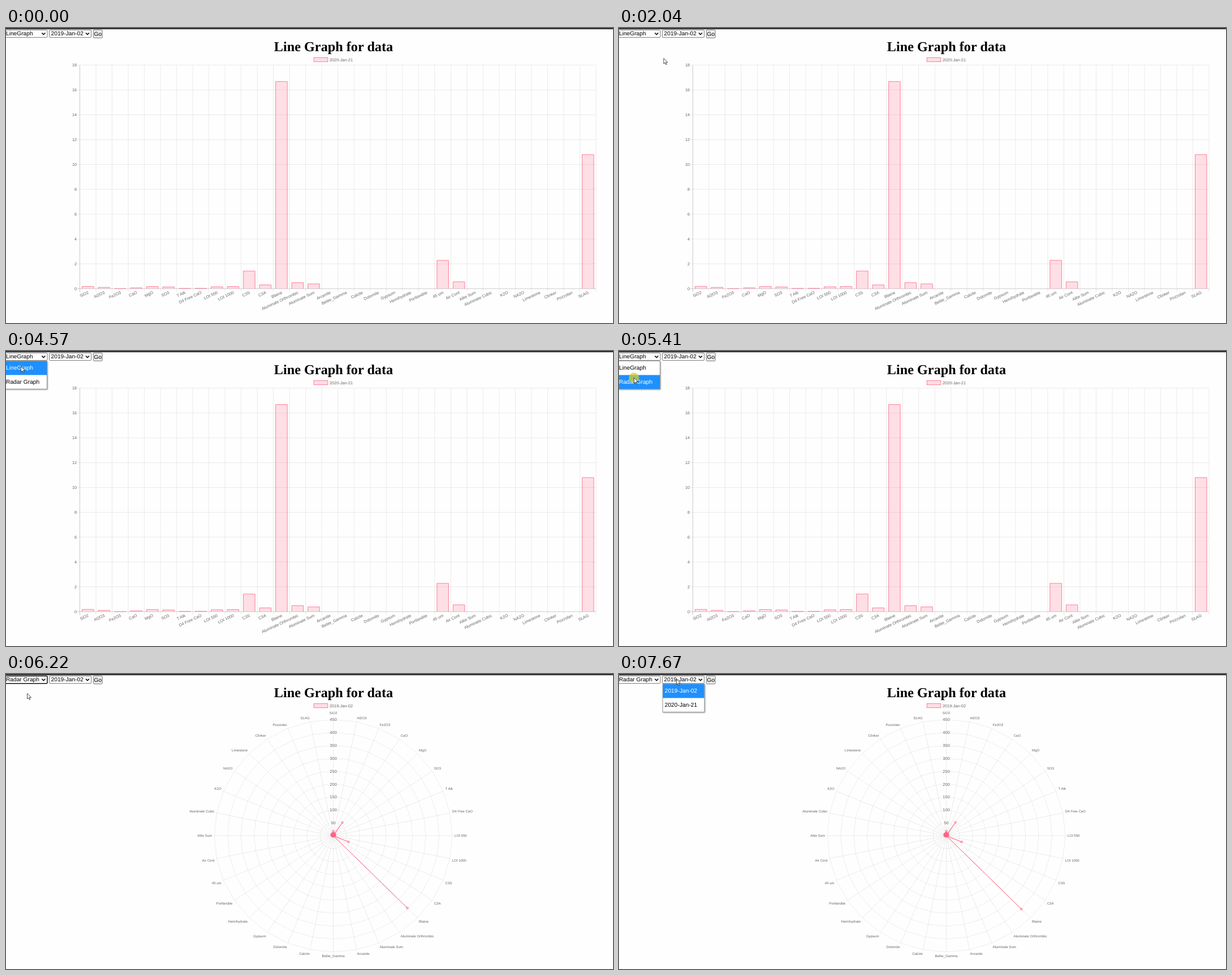
Animation, 1073 px wide and 522 px high, one loop 7990 ms. Source, as an HTML page:

```html
<!DOCTYPE html>
<html lang="en">
<head>
<meta charset="utf-8">
<title>Line Graph for data</title>
<style>
  html, body { margin: 0; width: 100%; height: 100%; overflow: hidden; background: #fefefe; }
  svg { display: block; width: 1073px; height: 522px; }
  text { font-family: "Liberation Sans", Arial, sans-serif; text-rendering: geometricPrecision; }
  .title { font-family: "Liberation Serif", "Times New Roman", serif; font-weight: bold; }
  .list { filter: drop-shadow(1px 1px 1.2px rgba(0, 0, 0, .4)); }
</style>
</head>
<body>
<svg id="stage" viewBox="0 0 1073 522"></svg>
<script>
const LOOP = 7990;
const OPEN_KIND = 3640, PICK_KIND = 5410, SWITCH = 5580, OPEN_DATE = 7520;
const PINK = 'rgb(255,99,132)', PALE = 'rgba(255,99,132,.2)';
const GRID = 'rgba(0,0,0,.1)', AXIS = 'rgba(0,0,0,.25)', GREY = '#666';
const LABELS = ('SiO2,Al2O3,Fe2O3,CaO,MgO,SO3,T Alk,D4 Free CaO,LOI 550,LOI 1000,C3S,C3A,Blaine,' +
  'Aluminate Orthrombic,Aluminate Sum,Arcanite,Belite_Gamma,Calcite,Dolomite,Gypsum,Hemihydrate,' +
  'Portlandite,45 um,Air Cont,Alite Sum,Aluminate Cubic,K2O,NA2O,Limestone,Clinker,Pozzolan,SLAG').split(',');

// The large values are named; the traces around them follow a wave.
const barPeaks = {
  'C3S': 1.42, 'C3A': .3, 'Blaine': 16.68, 'Aluminate Orthrombic': .48, 'Aluminate Sum': .38,
  '45 um': 2.28, 'Air Cont': .55, 'SLAG': 10.8
};
const radarPeaks = { 'SiO2': 18, 'CaO': 62.5, 'C3S': 63, 'Blaine': 402 };
const barValue = (name, i) => barPeaks[name] || (i < 10 ? .09 + .09 * Math.cos(i * 1.46) : 0);
const radarValue = (name, i) => radarPeaks[name] || Math.max(0, 4 + 5 * Math.cos(i / 5));

const stage = document.getElementById('stage');

function add(parent, tag, attrs) {
  const el = document.createElementNS('http://www.w3.org/2000/svg', tag);
  set(el, attrs);
  return parent.appendChild(el);
}
function set(el, attrs) {
  for (const key in attrs) el.setAttribute(key, attrs[key]);
}
const group = (parent, attrs) => add(parent, 'g', attrs);
const line = (parent, x1, y1, x2, y2, stroke) =>
  add(parent, 'line', { x1, y1, x2, y2, stroke, 'stroke-width': .8 });
const rect = (parent, x, y, width, height, attrs) =>
  add(parent, 'rect', { x, y, width, height, ...attrs });
// Text centred vertically on y.
function label(parent, str, x, y, size, fill = GREY, anchor = 'start', attrs = {}) {
  const el = add(parent, 'text', { x, y: y + size * .36, 'font-size': size, fill, 'text-anchor': anchor, ...attrs });
  el.textContent = str;
  return el;
}
const show = (el, on) => set(el, { visibility: on ? 'inherit' : 'hidden' });

// Page
rect(stage, 0, 0, 1073, 522, { fill: '#fefefe' });
rect(stage, 0, 0, 1073, 2.2, { fill: '#2f2c30' });
label(stage, 'Line Graph for data', 579, 32, 24.25, '#000', 'middle', { class: 'title' });
rect(stage, 544.2, 52.3, 24.6, 7.4, { fill: PALE, stroke: PINK, 'stroke-width': .8 });
const legend = label(stage, '', 572, 56, 7.3);

// Bar chart
const bars = group(stage);
const X0 = 130.5, STEP = 912.5 / LABELS.length, Y0 = 461.2, UNIT = 21.97, TOP = Y0 - 18 * UNIT;
for (let i = 0; i <= LABELS.length; i++) {
  const x = X0 + i * STEP;
  line(bars, x, TOP, x, Y0 + 6, i ? GRID : AXIS);
}
for (let v = 0; v <= 18; v += 2) {
  const y = Y0 - v * UNIT;
  line(bars, X0 - 5, y, 1043, y, v ? GRID : AXIS);
  label(bars, v, 125, y, 7.3, GREY, 'end');
}
LABELS.forEach((name, i) => {
  const x = X0 + (i + .5) * STEP, w = STEP * .36, value = barValue(name, i);
  label(bars, name, 0, 0, 7.3, GREY, 'end', { transform: `translate(${x + .8} 467.3) rotate(-25)` });
  if (value) {
    add(bars, 'path', {
      d: `M${x - w} ${Y0}V${Y0 - value * UNIT}H${x + w}V${Y0}`,
      fill: PALE, stroke: PINK, 'stroke-width': .8
    });
  }
});

// Radar chart
const radar = group(stage);
const CX = 578.6, CY = 286.2, RADIUS = 205.6, STRETCH = 1.0225, MAX = 450;
function polar(i, r) {
  const a = i / LABELS.length * 2 * Math.PI;
  return [CX + r * STRETCH * Math.sin(a), CY - r * Math.cos(a)];
}
const polygon = radii => radii.map((r, i) => polar(i, r).map(n => n.toFixed(2)).join()).join(' ');

LABELS.forEach((name, i) => {
  line(radar, CX, CY, ...polar(i, RADIUS), GRID);
  const [x, y] = polar(i, i ? 209.5 : 214);
  const anchor = i % 16 === 0 ? 'middle' : i < 16 ? 'start' : 'end';
  const shift = i % 16 === 8 ? 0 : i < 8 || i > 24 ? -3 : 3;
  label(radar, name, x, y + shift, 6.1, GREY, anchor);
});
for (let v = 50; v <= MAX; v += 50) {
  const points = polygon(LABELS.map(() => v / MAX * RADIUS));
  add(radar, 'polygon', { points, fill: 'none', stroke: GRID, 'stroke-width': .7 });
}
for (let v = 50; v <= MAX; v += 50) {
  const y = CY - v / MAX * RADIUS;
  rect(radar, CX - 7.5, y - 4.8, 15, 9.6, { fill: 'rgba(255,255,255,.75)' });
  label(radar, v, CX, y, 7.5, GREY, 'middle');
}
const shape = add(radar, 'polygon', { fill: PALE, stroke: PINK, 'stroke-width': .75 });
const dots = LABELS.map(() => add(radar, 'circle', { r: 1.9, fill: PALE, stroke: PINK, 'stroke-width': .7 }));

function drawRadar(grow) {
  const radii = LABELS.map((name, i) => radarValue(name, i) / MAX * RADIUS * grow);
  set(shape, { points: polygon(radii) });
  dots.forEach((dot, i) => {
    const [cx, cy] = polar(i, radii[i]);
    set(dot, { cx, cy });
  });
}

// Controls
function select(x, w, textX) {
  const box = rect(stage, x, 3.5, w, 13.2, { rx: 1.5, fill: '#fff', stroke: '#767676', 'stroke-width': 1 });
  add(stage, 'path', {
    d: `M${x + w - 9.6} 8.6l3 3l3 -3`, fill: 'none', stroke: '#111', 'stroke-width': 1.5
  });
  return { box, text: label(stage, '', textX, 9.8, 10.2, '#000') };
}
const kind = select(-2, 75, 0);
const date = select(76.6, 74, 79.6);
date.text.textContent = '2019-Jan-02';
rect(stage, 154.4, 3.4, 15.8, 14.2, { rx: 1.5, fill: '#efefef', stroke: '#767676', 'stroke-width': 1 });
label(stage, 'Go', 162.3, 10.1, 10.2, '#000', 'middle');

function list(x, w, textX, names) {
  const g = group(stage, { class: 'list' });
  const row = 24.5;
  rect(g, x, 17.8, w, 2 * row + .4, { fill: '#fff', stroke: '#777', 'stroke-width': .7 });
  const mark = rect(g, x + .3, 18, w - .6, row, { fill: '#1e90ff' });
  const texts = names.map((name, i) => label(g, name, textX, 29.6 + i * row, 10.25));
  return {
    g,
    pick(index) {
      set(mark, { y: 18 + index * row });
      texts.forEach((text, i) => set(text, { fill: i === index ? '#fff' : '#000' }));
    }
  };
}
const kindList = list(-2, 74.4, 0, ['LineGraph', 'Radar Graph']);
const dateList = list(77.2, 73.8, 80.7, ['2019-Jan-02', '2020-Jan-21']);
dateList.pick(0);

// Pointer
const halo = add(stage, 'circle', { r: 9, fill: '#d6cf2c', opacity: .75 });
const pointer = add(stage, 'path', {
  d: 'M0 0V9.8L2.3 7.7L3.9 11.3L5.4 10.6L3.8 7.2H7Z',
  fill: '#fff', stroke: '#222', 'stroke-width': .8, 'stroke-linejoin': 'round'
});

const TICK = 78;
const onKind = { x: 26.5, y: 9.3 }, onRadar = { x: 26.5, y: 47.3 }, onDate = { x: 101.5, y: 9 };
const below = { x: 37.5, y: 34.3 }, beside = { x: 79, y: 53.5 };
// Straight moves; the pointer rests between them unless it leaves the page.
const moves = [
  { start: 320, end: 640, from: { x: 1026, y: 518 }, to: { x: 1003, y: 508 }, leaves: true },
  { start: 1190, end: 1730, from: { x: 0, y: 420 }, to: { x: 82, y: 59 } },
  { start: 2040, end: 2350, from: beside, to: { x: 66, y: 39 }, leaves: true },
  { start: 2880, end: 3260, from: { x: 66, y: 4 }, to: onKind },
  { start: 4260, end: 5110, from: { x: 26.5, y: 16 }, to: onRadar },
  { start: SWITCH, end: 6220, from: onRadar, to: below },
  { start: 6220, end: 6750, from: below, to: onDate }
];
const clicks = [
  { start: OPEN_KIND, end: 3800, at: onKind },
  { start: PICK_KIND, end: SWITCH, at: onRadar },
  { start: OPEN_DATE, end: 7670, at: onDate }
];

function pointerAt(t) {
  const move = moves.findLast(m => m.start <= t);
  if (!move || move.leaves && t >= move.end) return null;
  const { start, end, from, to } = move;
  const steps = Math.round((end - start) / TICK);
  const u = Math.min(1, Math.floor((t - start) / (end - start) * steps) / steps);
  return { x: from.x + (to.x - from.x) * u, y: from.y + (to.y - from.y) * u };
}

function render(t) {
  const isRadar = t >= SWITCH;
  show(bars, !isRadar);
  show(radar, isRadar);
  legend.textContent = isRadar ? '2019-Jan-02' : '2020-Jan-21';
  kind.text.textContent = isRadar ? 'Radar Graph' : 'LineGraph';
  if (isRadar) drawRadar(1 - (1 - Math.min(1, (t - SWITCH + 10) / 1000)) ** 4);

  const focus = isRadar && t < OPEN_DATE;
  set(kind.box, { stroke: focus ? '#101018' : '#767676', 'stroke-width': focus ? 1.5 : 1 });

  const pos = pointerAt(t);
  show(pointer, pos);
  if (pos) set(pointer, { transform: `translate(${pos.x} ${pos.y})` });
  show(kindList.g, t >= OPEN_KIND && t < SWITCH);
  kindList.pick(pos && pos.y >= 42 ? 1 : 0);
  show(dateList.g, t >= OPEN_DATE);

  const click = clicks.find(c => t >= c.start && t < c.end);
  show(halo, click);
  if (click) set(halo, { cx: click.at.x, cy: click.at.y });
}

const begin = performance.now();
function tick() {
  render((performance.now() - begin) % LOOP);
  requestAnimationFrame(tick);
}
tick();
</script>
</body>
</html>
```
